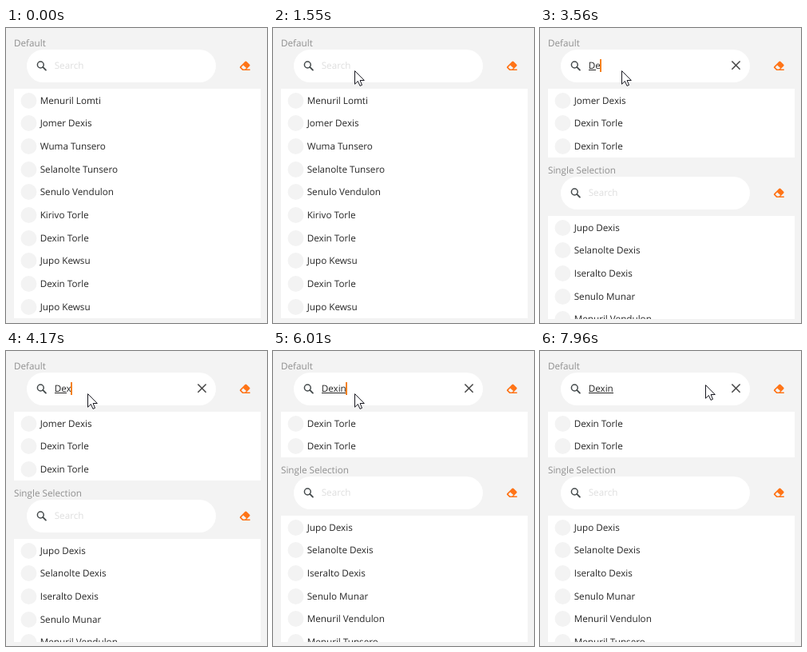
Animation of 327 by 369 pixels, one loop 8 s. Source, as an HTML page:

```html
<!DOCTYPE html>
<html lang="en">
<head>
<meta charset="utf-8">
<title>Search filter</title>
<style>
  html, body { margin: 0; width: 100%; height: 100%; overflow: hidden; background: #f3f3f3; }
  svg { display: block; width: 327px; height: 369px; }
  text { font: 11.7px "Open Sans", sans-serif; fill: #262626; text-rendering: geometricPrecision; }
  .label { fill: #8f8f8f; }
  .hint { fill: #dedede; }
</style>
</head>
<body>
<svg viewBox="0 0 327 369">
  <defs>
    <clipPath id="view"><rect width="327" height="364"/></clipPath>
    <g id="bar">
      <rect x="26" y="27" width="237" height="41" rx="20.5" fill="#fff"/>
      <g fill="none" stroke="#444a4c">
        <circle cx="43.3" cy="46" r="3.9" stroke-width="1.5"/>
        <path d="M46.2 48.9L49.9 52.6" stroke-width="1.9" stroke-linecap="round"/>
      </g>
      <path fill="#ff7417" fill-rule="evenodd" d="M296.2 53L293.2 50Q292.4 49.1 293.2 48.2L299.4 41.9Q300.5 41 301.5 41.9L305.3 45.7Q306.1 46.6 305.3 47.5L301.3 51.6H305.8V53ZM297.2 46.5L294.9 48.9Q294.7 49.1 294.9 49.3L297.1 51.6H299.5L301.1 50.1Z"/>
    </g>
  </defs>
  <rect width="327" height="369" fill="#f3f3f3"/>
  <g clip-path="url(#view)">
    <text class="label" x="10" y="23">Default</text>
    <use href="#bar"/>
    <text id="query" x="60.7" y="51"></text>
    <rect id="under" x="61" y="52" height="1" fill="#262626"/>
    <rect id="caret" y="39" width="2" height="16" fill="#f58220"/>
    <path id="clear" d="M240.4 41.5l10.2 10.2m0-10.2l-10.2 10.2" stroke="#484848" stroke-width="1.6" fill="none"/>
    <g id="list1"></g>
    <g id="single">
      <text class="label" x="10" y="23">Single Selection</text>
      <use href="#bar"/>
      <text class="hint" x="60.7" y="51">Search</text>
      <g id="list2"></g>
    </g>
  </g>
  <path id="mouse" d="M.5.6V17.2L4.4 13.5L7 19.4L9.5 18.3L7.1 12.5H12.3Z" fill="#fff" stroke="#17171f" stroke-width="1"/>
</svg>
<script>
const LOOP = 8000, ROW = 86 / 3;
const $ = id => document.getElementById(id);
const people = ["Menuril Lomti", "Jomer Dexis", "Wuma Tunsero", "Selanolte Tunsero", "Senulo Vendulon",
  "Kirivo Torle", "Dexin Torle", "Jupo Kewsu", "Dexin Torle", "Jupo Kewsu"];
const others = ["Jupo Dexis", "Selanolte Dexis", "Iseralto Dexis", "Senulo Munar",
  "Menuril Vendulon", "Menuril Tunsero", "Wuma Munar", "Kirivo Torle"];

// [time, value]: the latest entry reached applies
const typed = [[0, ""], [2590, "D"], [3560, "De"], [4170, "Dex"], [4640, "Dexi"], [5760, "Dexin"]];
const lined = [[0, 0], [2710, 1], [3800, 2], [4640, 3], [4880, 4], [6010, 5]];
const blink = [[0, 0], [1180, 1], [1550, 0], [2590, 1], [3800, 0], [4170, 1], [5340, 0],
  [5760, 1], [6510, 0], [6980, 1], [7500, 0]];
const at = (track, t) => track.filter(k => k[0] <= t).pop()[1];

// advance widths in em for the letters of the query
const ems = { D: .729, e: .561, x: .524, i: .253, n: .613 };
const width = s => [...s].reduce((w, c) => w + ems[c] * 11.7, 0);

function listMarkup(names) {
  const h = Math.round(names.length * ROW);
  return `<rect x="10" y="76" width="309" height="${h}" fill="#fff"/>` + names.map((name, i) => {
    const y = Math.round(90.5 + i * ROW);
    return `<circle cx="28.5" cy="${y}" r="10" fill="#f3f3f3"/><text x="42.7" y="${y + 4}">${name}</text>`;
  }).join("");
}

const bezier = (p, u) => {
  const v = 1 - u;
  return v * v * v * p[0] + 3 * v * v * u * p[1] + 3 * v * u * u * p[2] + u * u * u * p[3];
};
const step = (t, start, gap, last) => Math.min(last, Math.floor((t - start) / gap));

function mousePos(t) {
  if (t < 330) return null;
  if (t < 6120) {
    const k = step(t, 330, 47, 10) / 10, u = 1 - (1 - k) ** 1.6;
    return [bezier([46, 110, 177, 102], u), bezier([239, 190, 85, 53], u)].map(Math.round);
  }
  if (t < 6240) return [102, 52];
  if (t < 7730) return [101, 52];
  const k = (step(t, 7730, 46, 5) + 1) / 6, u = k * k * (3 - 2 * k);
  return [Math.round(101 + 106 * u), Math.round(52 - 10 * u)];
}

let shown = null;
function showQuery(q) {
  if (q === shown) return;
  shown = q;
  const hits = people.filter(n => n.toLowerCase().includes(q.toLowerCase()));
  $("query").textContent = q || "Search";
  $("query").setAttribute("class", q ? "" : "hint");
  $("clear").style.display = q ? "" : "none";
  $("caret").setAttribute("x", 61 + Math.max(0, Math.floor(width(q) - .5)));
  $("list1").innerHTML = listMarkup(hits);
  $("single").setAttribute("transform", `translate(0 ${Math.round(hits.length * ROW + 73)})`);
}

function render(t) {
  const q = at(typed, t), pos = mousePos(t);
  showQuery(q);
  $("under").setAttribute("width", Math.round(width(q.slice(0, at(lined, t)))));
  $("caret").style.display = at(blink, t) ? "" : "none";
  $("mouse").style.display = pos ? "" : "none";
  if (pos) $("mouse").setAttribute("transform", `translate(${pos})`);
}

$("list2").innerHTML = listMarkup(others);
render(0);
const begin = performance.now();
(function tick() {
  render((performance.now() - begin) % LOOP);
  requestAnimationFrame(tick);
})();
</script>
</body>
</html>
```
